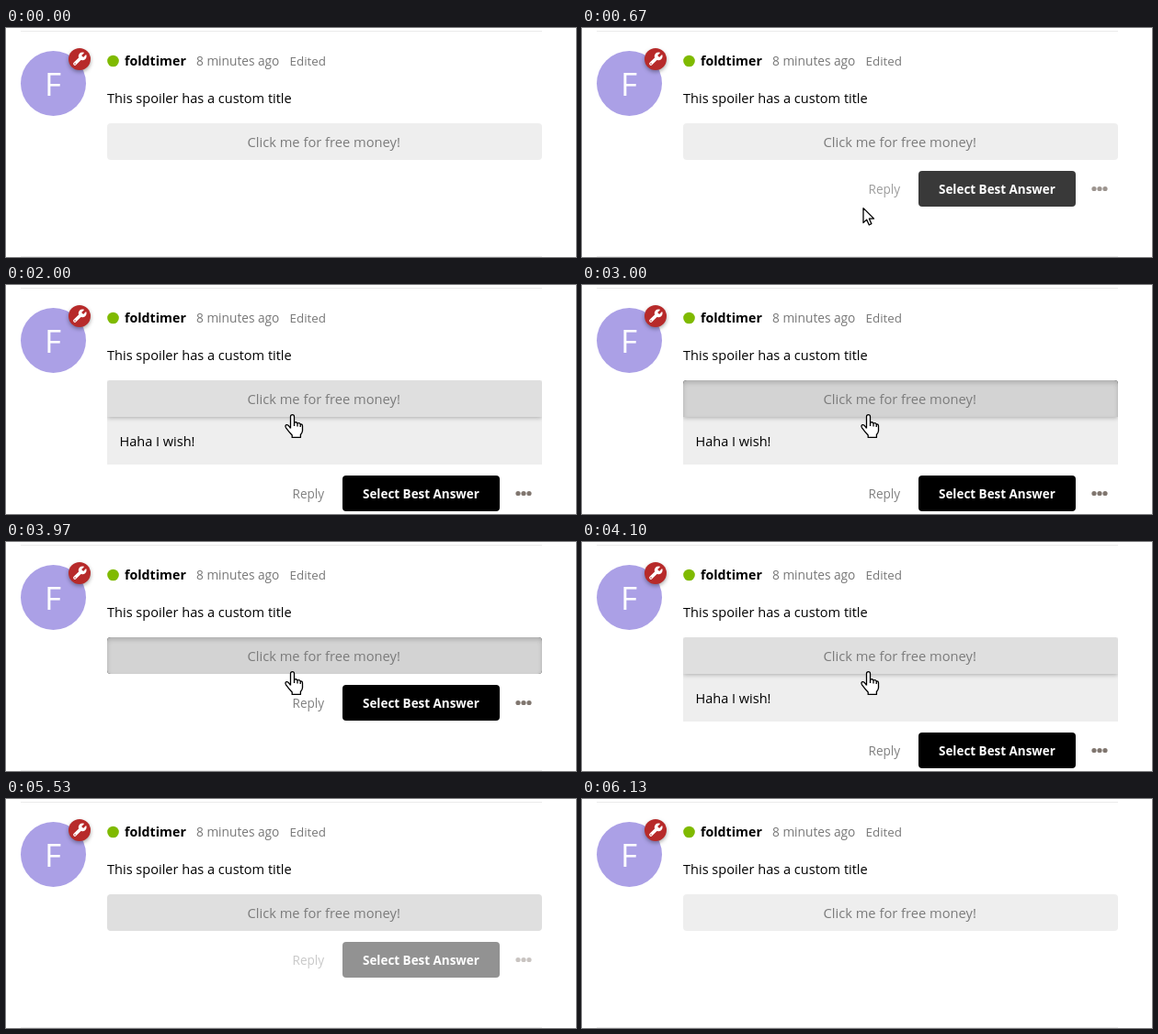
These frames come from a looping animation (620 px wide and 250 px high, 6210 ms). An HTML page with a canvas:

```html
<!DOCTYPE html>
<html lang="en">
<head>
<meta charset="utf-8">
<title>Spoiler with a custom title</title>
<style>
html, body { margin: 0; width: 100%; height: 100%; overflow: hidden; background: #fff; }
canvas { display: block; width: 620px; height: 250px; }
</style>
</head>
<body>
<canvas id="stage"></canvas>
<script>
const W = 620, H = 250, LOOP = 6210;
const canvas = document.getElementById('stage');
const dpr = window.devicePixelRatio || 1;
canvas.width = W * dpr;
canvas.height = H * dpr;
const ctx = canvas.getContext('2d');

const clamp = v => Math.max(0, Math.min(1, v));
const span = (t, a, b) => clamp((t - a) / (b - a));
const easeOut = (p, n) => 1 - Math.pow(1 - p, n);
const within = (t, a, b) => t >= a && t < b;

// press moment, release moment; each release toggles the spoiler
const clicks = [[1870, 2000], [3000, 3130], [3970, 4100], [5030, 5130]];

function text(str, x, y, size, color, weight = 400) {
  ctx.font = `${weight} ${size}px "Open Sans", "Noto Sans", sans-serif`;
  ctx.fillStyle = color;
  ctx.fillText(str, x, y);
}

function disc(x, y, r, color) {
  ctx.fillStyle = color;
  ctx.beginPath();
  ctx.arc(x, y, r, 0, Math.PI * 2);
  ctx.fill();
}

function box(x, y, w, h, radius, color) {
  ctx.fillStyle = color;
  ctx.beginPath();
  ctx.roundRect(x, y, w, h, radius);
  ctx.fill();
}

function shadow(color, blur, dy) {
  ctx.shadowColor = color;
  ctx.shadowBlur = blur * dpr;
  ctx.shadowOffsetY = dy * dpr;
}

function line(y) {
  ctx.fillStyle = '#ebebeb';
  ctx.fillRect(16, y, 567, 1);
}

function wrench() {
  ctx.save();
  ctx.translate(80, 34);
  ctx.rotate(Math.PI / 4);
  ctx.fillStyle = '#fff';
  ctx.beginPath();
  ctx.roundRect(-1.8, -4, 3.6, 13, 1.8);
  ctx.fill();
  disc(0, -4.5, 4.4, '#fff');
  ctx.fillStyle = '#b72a2a';
  ctx.fillRect(-1.4, -10, 2.8, 5.6);
  disc(0, 7, 0.7, '#b72a2a');
  ctx.restore();
}

function header() {
  line(3);
  disc(51.5, 60.5, 35.5, '#aba0e6');
  ctx.textAlign = 'center';
  text('F', 51, 74, 35, '#fff');
  ctx.textAlign = 'left';

  ctx.save();
  shadow('rgba(0,0,0,.35)', 4, 2);
  disc(80, 34, 12, '#b72a2a');
  ctx.restore();
  wrench();

  disc(116.5, 36, 6.3, '#7fba00');
  text('foldtimer', 129, 41, 14.2, '#000', 700);
  text('8 minutes ago', 207, 41, 13.7, '#777');
  text('Edited', 308.5, 41, 13.4, '#777');
  text('This spoiler has a custom title', 110, 82, 14.55, '#000');
}

function spoiler(open, hover, pressed) {
  const radius = open ? [4, 4, 0, 0] : 4;
  if (open) {
    box(110, 142, 473, 54, 0, '#eee');
    ctx.save();
    ctx.beginPath();
    ctx.rect(110, 104, 473, 92);
    ctx.clip();
    shadow('rgba(0,0,0,.28)', 5, 1);
    box(110, 104, 473, 40, radius, '#dfdfdf');
    ctx.restore();
    text('Haha I wish!', 123.5, 176, 14.5, '#000');
  }
  box(110, 104, 473, 40, radius, pressed ? '#d3d3d3' : hover ? '#dfdfdf' : '#eee');
  if (pressed) {
    ctx.save();
    ctx.clip();
    shadow('rgba(0,0,0,.16)', 5, 3);
    ctx.fillStyle = '#000';
    ctx.beginPath();
    ctx.rect(80, 74, 533, 100);
    ctx.roundRect(110, 104, 473, 40, radius);
    ctx.fill('evenodd');
    ctx.restore();
  }
  text('Click me for free money!', 262.5, 130, 14.7, '#7b7b7b');
}

function actions(alpha, dy) {
  ctx.save();
  ctx.translate(0, dy);
  text('Reply', 311.5, 181, 13.6, '#808080');
  box(366, 156, 171, 39, 4, '#000');
  text('Select Best Answer', 388, 181, 13.45, '#fff', 700);
  for (let i = 0; i < 3; i++) disc(557 + i * 6, 175.5, 2.6, '#80766f');
  // a white veil fades the row as one group
  ctx.globalAlpha = 1 - alpha;
  ctx.fillStyle = '#fff';
  ctx.fillRect(300, 150, 283, 50);
  ctx.restore();
}

function outline(d, x, y) {
  const path = new Path2D(d);
  ctx.save();
  ctx.translate(x, y);
  ctx.fillStyle = '#fff';
  ctx.strokeStyle = '#000';
  ctx.lineWidth = 1.3;
  ctx.lineJoin = 'round';
  ctx.fill(path);
  ctx.stroke(path);
  ctx.restore();
}

const HAND = 'M6.5 15.5V2.8Q6.5 .7 8.5 .7T10.5 2.8V9.2Q13 8 14 10Q16.3 9 17.2 11' +
  'Q19.5 10.6 19.5 13V18Q19.5 20 17.4 22.5V25.4H8.2V23Q5 19.5 1.5 14.8' +
  'Q.2 12.5 2 11.7T6.5 15.5M10.5 9.2V13M14 10V13.4M17.2 11V14';
const ARROW = 'M.5 .5V16.5L4.2 13L6.8 18.8L9.4 17.6L6.9 12H12Z';

// hand's top-left corner, or null while the pointer is away
function pointer(t) {
  if (within(t, 570, 1230)) {
    const p = easeOut(span(t, 560, 1100), 3);
    return [296 + 7 * p, 250 - 108 * p];
  }
  if (within(t, 1230, 5330)) return [303, 141];
  if (within(t, 5330, 5480)) {
    const p = span(t, 5310, 5480);
    return [303 - 270 * p, 141 + 112 * p * p];
  }
  return null;
}

function draw(t) {
  const pressed = clicks.some(c => within(t, c[0], c[1]));
  const open = clicks.filter(c => t >= c[1]).length % 2 === 1;
  const at = pointer(t);
  const over = at && at[1] < 144 && t < 5330;
  const hover = over || within(t, 1230, 6130);
  const alpha = easeOut(span(t, 560, 770), 2) * (1 - easeOut(span(t, 5465, 5655), 2));
  const dy = open ? 52 : 0;

  ctx.setTransform(dpr, 0, 0, dpr, 0, 0);
  ctx.fillStyle = '#fff';
  ctx.fillRect(0, 0, W, H);
  header();
  line(249 + dy);
  spoiler(open, hover, pressed);
  if (alpha > 0) actions(alpha, dy);
  if (over) outline(HAND, at[0], at[1]);
  else if (at) outline(ARROW, at[0] + 6, at[1]);
}

const start = performance.now();
function tick() {
  draw((performance.now() - start) % LOOP);
  requestAnimationFrame(tick);
}
tick();
</script>
</body>
</html>
```
